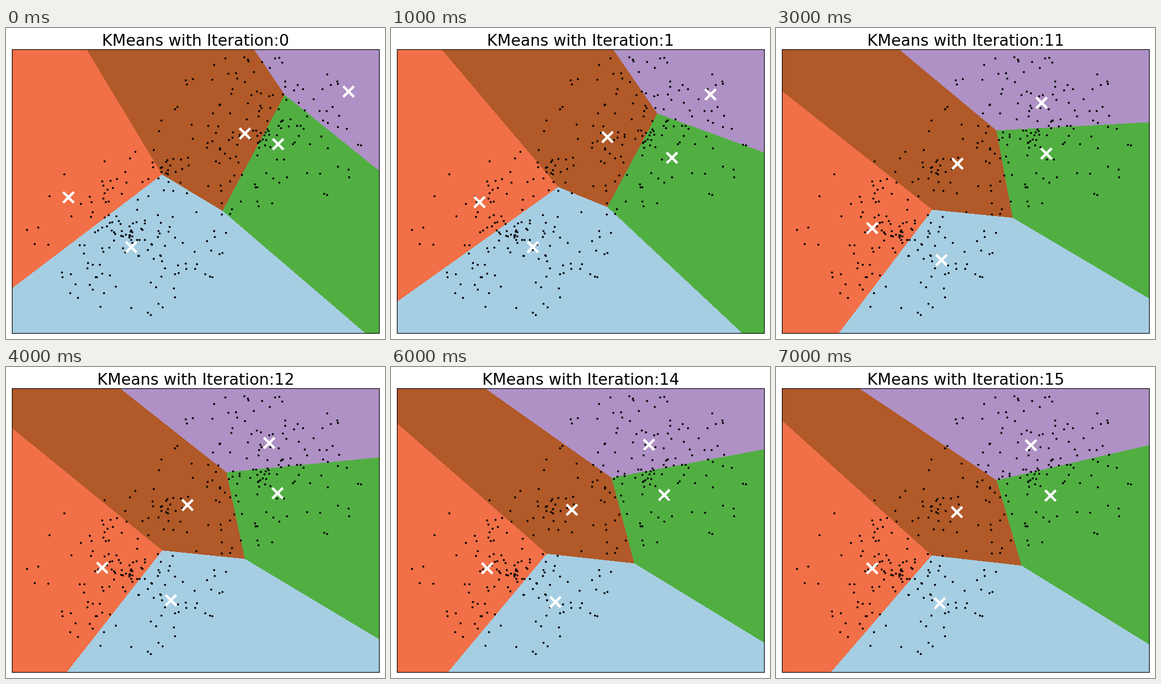
These frames come from a looping animation (640x526 px, 8 s). A matplotlib script:

```python
import numpy as np
import matplotlib.pyplot as plt
from matplotlib.animation import FuncAnimation
from matplotlib.colors import ListedColormap

W, H, DPI = 640, 526, 100
LEFT, RIGHT, TOP, BOTTOM = 10, 630, 36, 516
X_WEIGHT = 0.602  # squared ratio of the x and y data scales on screen

# region order: left, bottom, middle, right, top
COLORS = ListedColormap(["#f17047", "#a6cee3", "#b15928", "#51af42", "#af91c5"])

# frames are ordered by file name, so 10 follows 1
STEPS = [0, 1, 10, 11, 12, 13, 14, 15]

# cluster centers at key iterations, linear in between
KEYS = {
    0: [(105, 286), (211, 370), (403, 178), (459, 196), (578, 107)],
    1: [(149, 294), (239, 370), (365, 184), (474, 219), (539, 112)],
    10: [(164, 335.5), (278, 390.6), (309, 223), (456.3, 212), (451.7, 126)],
    11: [(162, 338.4), (279, 391.8), (306, 228.7), (456, 212), (448.3, 126)],
    15: [(162, 340), (276, 399), (305, 244.7), (463, 217), (430.4, 132)],
}


def centers_at(step):
    tracks = np.reshape(list(KEYS.values()), (len(KEYS), -1)).T
    flat = [np.interp(step, list(KEYS), track) for track in tracks]
    return np.reshape(flat, (-1, 2))


def disc(rng, cx, cy, rx, ry, n):
    """Points at uniform radius and angle, dense towards the middle."""
    r = rng.uniform(0, 1, n)
    a = rng.uniform(0, 2 * np.pi, n)
    return np.column_stack([cx + rx * r * np.cos(a), cy + ry * r * np.sin(a)])


def make_points():
    rng = np.random.default_rng(4)
    return np.vstack([
        disc(rng, 425, 181, 181, 142, 160),
        disc(rng, 209, 350, 175, 142, 160),
        rng.normal((280, 238), (13, 14), (12, 2)),
    ])


gx, gy = np.meshgrid(np.arange(LEFT, RIGHT) + 0.5, np.arange(TOP, BOTTOM) + 0.5)


def regions(centers):
    dist = [X_WEIGHT * (gx - x) ** 2 + (gy - y) ** 2 for x, y in centers]
    return np.argmin(dist, axis=0)


fig = plt.figure(figsize=(W / DPI, H / DPI), dpi=DPI, facecolor="white")
ax = fig.add_axes([LEFT / W, 1 - BOTTOM / H, (RIGHT - LEFT) / W, (BOTTOM - TOP) / H])
image = ax.imshow(np.zeros(gx.shape), cmap=COLORS, vmin=-0.5, vmax=4.5,
                  interpolation="nearest", aspect="auto",
                  extent=(LEFT, RIGHT, BOTTOM, TOP))
ax.plot(*make_points().T, "k.", markersize=3)
crosses = ax.scatter([], [], marker="x", s=169, linewidths=3, color="w", zorder=10)
ax.set(xlim=(LEFT, RIGHT), ylim=(BOTTOM, TOP), xticks=[], yticks=[])
title = ax.set_title("", fontsize=19.2, pad=4.6, fontname="DejaVu Sans")


def draw(i):
    step = STEPS[i]
    centers = centers_at(step)
    image.set_data(regions(centers))
    crosses.set_offsets(centers)
    title.set_text(f"KMeans with Iteration:{step}")
    return image, crosses, title


anim = FuncAnimation(fig, draw, frames=len(STEPS), interval=1000, repeat=True)
plt.show()
```
